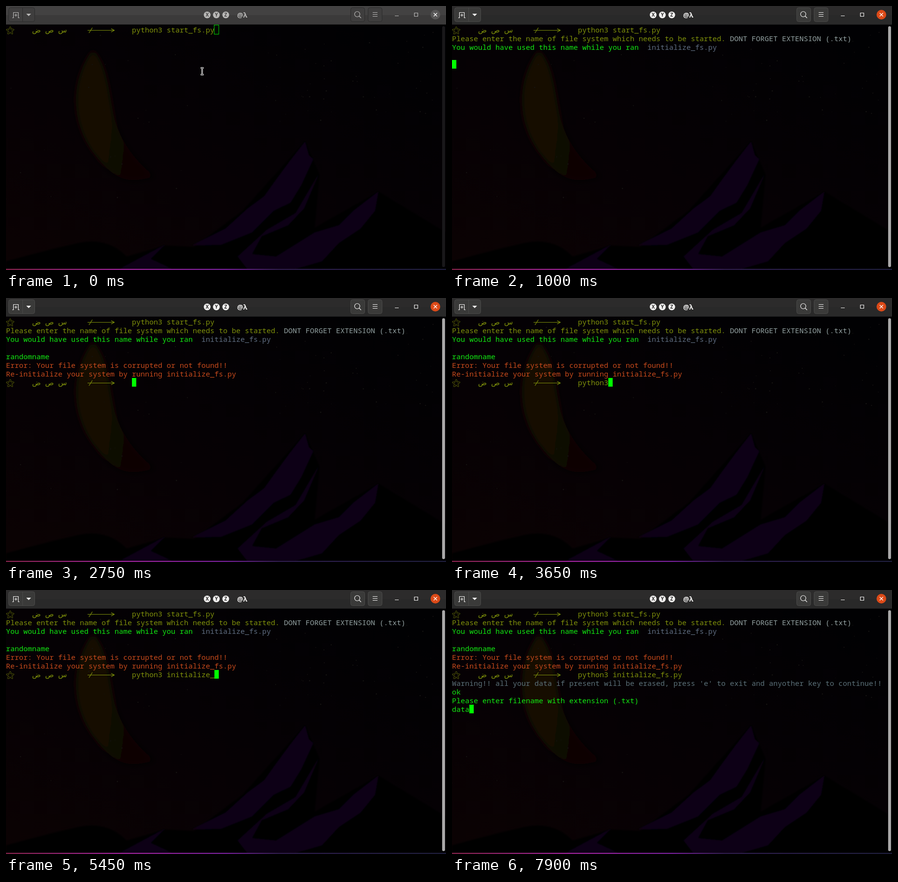
Write an HTML page that moves like this. It is 912x548 px and loops after 8000 ms.

```html
<!DOCTYPE html>
<html lang="en">
<head>
<meta charset="utf-8">
<title>Terminal</title>
<style>
  html, body { margin: 0; width: 100%; height: 100%; overflow: hidden; background: #020103; }
  svg { display: block; width: 912px; height: 548px; }
  #term text { font: 15px "Noto Sans Mono", "DejaVu Sans Mono", monospace; white-space: pre; }
  #term .sign { font: 15px "DejaVu Sans", sans-serif; }
  .title { font: bold 14px "Open Sans", "Noto Sans", sans-serif; }
  .badge { font: bold 10px "Open Sans", "Noto Sans", sans-serif; text-anchor: middle; }
</style>
</head>
<body>
<svg viewBox="0 0 912 548">
  <defs>
    <linearGradient id="sky" x1="0" y1="1" x2=".75" y2="0">
      <stop offset="0" stop-color="#0b0203"/>
      <stop offset=".45" stop-color="#060104"/>
      <stop offset="1" stop-color="#010103"/>
    </linearGradient>
    <linearGradient id="moon" x1="0" y1=".4" x2="1" y2=".6">
      <stop offset="0" stop-color="#130b01"/>
      <stop offset=".45" stop-color="#120901"/>
      <stop offset="1" stop-color="#080202"/>
    </linearGradient>
    <linearGradient id="strip">
      <stop offset="0" stop-color="#7c2146"/>
      <stop offset=".25" stop-color="#91208c"/>
      <stop offset=".5" stop-color="#6c1d8c"/>
      <stop offset=".62" stop-color="#2a1a46"/>
      <stop offset="1" stop-color="#1c1c38"/>
    </linearGradient>
    <filter id="soft"><feGaussianBlur stdDeviation="7"/></filter>
    <filter id="haze"><feGaussianBlur stdDeviation="1.5"/></filter>
  </defs>

  <rect width="912" height="548" fill="url(#sky)"/>
  <path d="M180 90C135 150 130 240 185 310S270 360 310 355C265 320 232 275 222 220S208 120 180 90Z" fill="url(#moon)" filter="url(#soft)"/>
  <path d="M0 530Q90 505 150 492T250 520L330 497 390 500 490 425 620 280 650 350 640 460 772 385 912 470V548H0Z" fill="#030104" filter="url(#haze)"/>
  <g fill="#0d0013" filter="url(#haze)">
    <path d="M620 281L588 322 560 360 535 395 500 421 455 462 385 497 445 496 510 470 555 425 590 408 612 372 637 318 628 310Z"/>
    <path d="M650 345L618 420 585 455 530 478 510 515 560 520 640 470 690 455 720 425 772 385 765 425 735 462 690 492 655 530 600 546H500L480 520 540 465 600 430Z"/>
    <path d="M330 495L235 546H345L300 525Z"/>
  </g>
  <g id="stars" fill="#171513"></g>
  <rect y="545.5" width="912" height="2.5" fill="url(#strip)"/>

  <g id="term"></g>
  <g id="mouse" fill="none">
    <path d="M403.500 128.500h6M403.500 142.500h6M406.500 128.500v14" stroke="#fff" stroke-width="3"/>
    <path d="M404 128.500h5M404 142.500h5M406.500 128.500v14" stroke="#111"/>
  </g>
  <g id="idle"></g>
  <g id="active"></g>
</svg>

<script>
const LOOP = 8000, CELL = 9, ROW = 18, TOP = 40;
const OLIVE = '#7f900b', GREEN = '#12e812', ORANGE = '#c64a1c',
      GREY = '#93a1a1', SLATE = '#5f6d80', DIM = '#5b7078';
const $ = id => document.getElementById(id);

// Window frame: title bar and scroll bar
function frame(top, bottom, button, edge, ink, close, bar) {
  const box = (x, w) => `<rect x="${x}.5" y="3.5" width="${w}" height="29" rx="4" fill="${button}" stroke="${edge}"/>`;
  const badge = (x, c) => `<circle cx="${x}" cy="18.500" r="7" fill="${ink}"/>
    <text class="badge" x="${x}" y="22" fill="${top}">${c}</text>`;
  return `<rect width="912" height="19" fill="${top}"/><rect y="19" width="912" height="20" fill="${bottom}"/>
    <path d="M0 38.500H912" stroke="#1a1a1a"/>
    ${box(5, 54)}${box(714, 29)}${box(750, 29)}
    <path d="M34.500 4v28" stroke="${edge}"/>
    <g fill="none" stroke="${ink}" stroke-width="1.2">
      <path d="M13 24.500h2.500v-11h10v11H28M20.500 16v6M17.500 19h6"/>
      <circle cx="728" cy="17" r="5.500"/><path d="M732 21l4 4M760 13.500h10M760 17.500h10M760 21.500h10"/>
      <path d="M806 20.500h8M846.500 14.500h7v7h-7z"/>
    </g>
    <path d="M42 16h10l-5 5z" fill="${ink}"/>
    <circle cx="890" cy="18" r="10" fill="${close}"/>
    <path d="M886.500 14.500l7 7m0-7l-7 7" stroke="#fff" stroke-width="1.3"/>
    ${badge(417, 'X')}${badge(436, 'Y')}${badge(455.5, 'Z')}
    <text class="title" x="479" y="24" fill="${ink}">@λ</text>
    <rect x="904" y="42" width="6" height="500" rx="3" fill="${bar}"/>`;
}
$('idle').innerHTML = frame('#434242', '#3b3a3a', '#3f3e3e', '#2b2b2b', '#b9b8b7', '#585757', '#19181a');
$('active').innerHTML = frame('#2c2b2b', '#292929', '#3a3a39', '#4a4a49', '#f2f1f0', '#dc4a18', '#a9a8a8');

let seed = 7;
const rnd = () => (seed = seed * 16807 % 2147483647) / 2147483647;
$('stars').innerHTML = Array.from({ length: 70 }, (_, i) => {
  const x = i % 3 ? 540 + rnd() * 360 : rnd() * 400, y = i % 3 ? 50 + rnd() * 190 : 60 + rnd() * 370;
  return `<circle cx="${x}" cy="${y}" r="${.5 + rnd() * .8}"/>`;
}).join('');

// [row, column, colour, text]
const lines = [
  [0, 29, OLIVE, 'python3 start_fs.py'],
  [1, 0, OLIVE, 'Please enter the name of file system which needs to be started.'],
  [1, 64, GREY, 'DONT FORGET EXTENSION (.txt)'],
  [2, 0, GREEN, 'You would have used this name while you ran'],
  [2, 45, SLATE, 'initialize_fs.py'],
  [4, 0, GREEN, 'randomname'],
  [5, 0, ORANGE, 'Error: Your file system is corrupted or not found!!'],
  [6, 0, ORANGE, 'Re-initialize your system by running initialize_fs.py'],
  [7, 29, OLIVE, 'python3 initialize_fs.py'],
  [8, 0, DIM, "Warning!! all your data if present will be erased, press 'e' to exit and anyother key to continue!!"],
  [9, 0, GREEN, 'ok'],
  [10, 0, GREEN, 'Please enter filename with extension (.txt)'],
  [11, 0, GREEN, 'data']
];

// Cursor track: [time, row, column, lit]; text shows up to the cursor
const type = (row, col, ...times) => times.map((t, i) => [t, row, col + i, 1]);
const track = [
  [0, 0, 48, 1], [650, 0, 48, 0], [900, 1, 0, 1], [1000, 4, 0, 1], [1200, 4, 0, 0],
  ...type(4, 1, 1400, 1500, 1550, 1650, 1700, 1800, 2100, 2150, 2200, 2250), [2350, 4, 10, 0],
  [2750, 7, 29, 1], [3100, 7, 29, 0], [3650, 7, 36, 1], [3800, 7, 36, 0],
  ...type(7, 37, 4050, 4250, 4350, 4450, 4600, 4700, 4800, 4900, 4950, 5050, 5150, 5450, 5700, 5850, 5950, 6050, 6200),
  [6450, 8, 0, 1], [6500, 9, 0, 1], [6700, 9, 0, 0],
  ...type(9, 1, 7200, 7300), [7450, 11, 0, 1], ...type(11, 1, 7650, 7700, 7800, 7900)
];

const prompt = row => `<g transform="translate(0 ${row * ROW})" fill="${OLIVE}">
  <text class="sign" x="0" y="56" style="font-size:18px">⚝</text>
  <text class="sign" x="54" y="55">ض</text><text class="sign" x="81" y="55">ص</text><text class="sign" x="108" y="55">س</text>
  <path d="M169 50.500H224M172 56L179 45M218 47l6.500 3.500-6.500 3.500" fill="none" stroke="${OLIVE}" stroke-width="1.2"/></g>`;

$('term').innerHTML = prompt(0) + `<g id="second">${prompt(7)}</g>` +
  lines.map(([r, c, ink]) => `<text class="line" x="${c * CELL}" y="${TOP + r * ROW + 15}" fill="${ink}"></text>`).join('') +
  '<rect id="cursor"/>';
const nodes = document.querySelectorAll('.line');

function set(el, attrs) {
  for (const k in attrs) el.setAttribute(k, attrs[k]);
}

function draw(now) {
  const t = now % LOOP;
  const [, row, col, lit] = track.findLast(k => k[0] <= t);
  lines.forEach(([r, c, , text], i) => {
    const shown = row > r ? text.length : row === r ? Math.max(0, col - c) : 0;
    nodes[i].textContent = text.slice(0, shown);
  });
  const focused = t >= 350, inset = focused ? 0 : .5;
  set($('cursor'), {
    x: col * CELL - inset, y: TOP + row * ROW - inset, width: CELL + inset, height: ROW + 2 * inset,
    fill: focused ? '#0f0' : 'none', stroke: focused ? 'none' : '#0d0', opacity: lit
  });
  set($('second'), { opacity: row >= 7 ? 1 : 0 });
  set($('mouse'), { opacity: t < 900 ? 1 : 0 });
  set($('active'), { opacity: Math.min(1, Math.max(0, Math.floor((t - 300) / 50) / 4)) });
  requestAnimationFrame(draw);
}
draw(performance.now());
</script>
</body>
</html>
```
